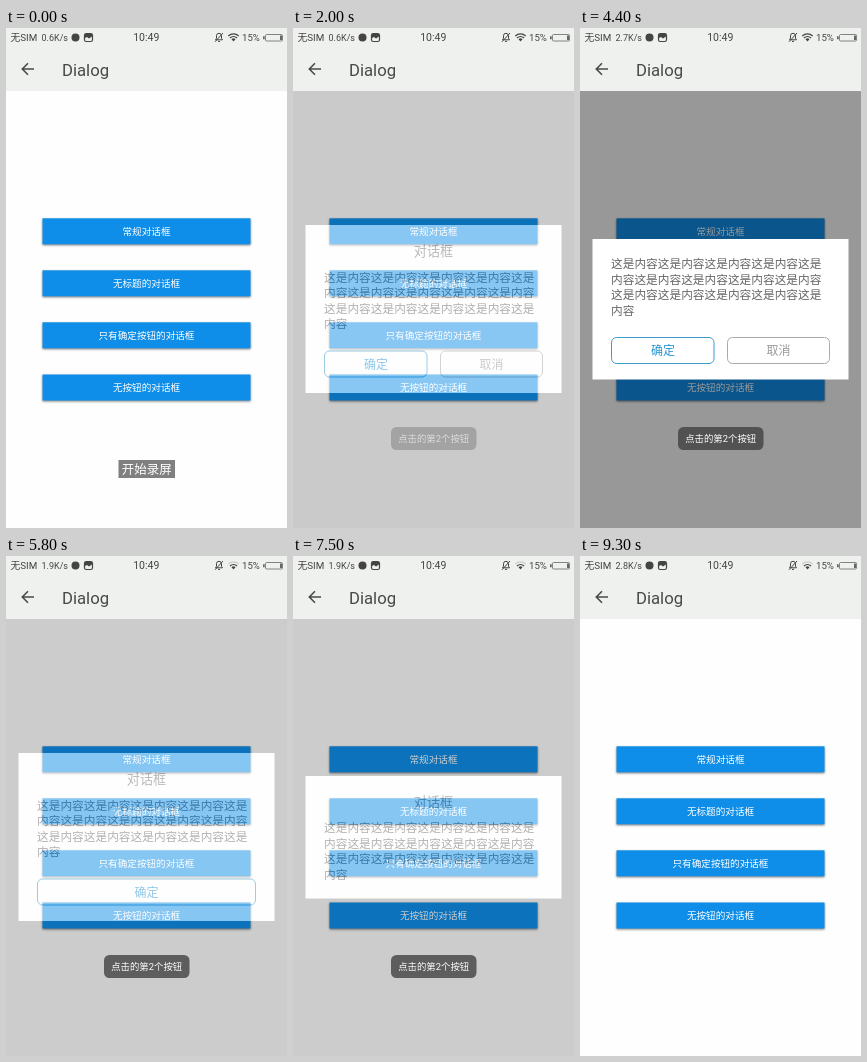
These frames come from a looping animation (281 px wide and 500 px high, 9800 ms). An HTML page:

```html
<!DOCTYPE html>
<html lang="zh-CN">
<head>
<meta charset="utf-8">
<title>Dialog</title>
<style>
html, body { margin: 0; width: 100%; height: 100%; overflow: hidden; background: #fdfefd; }
svg { display: block; width: 100vw; height: 100vh; }
text { font-family: Roboto, "Noto Sans CJK SC", "Noto Sans CJK", sans-serif; }
.mid { text-anchor: middle; }

.status { fill: #444; }
.btn rect { fill: #0f8ee9; filter: drop-shadow(0 1px .8px rgba(0, 0, 0, .5)); }
.btn text { fill: #fff; font-size: 9.6px; }
.title { font-size: 13.1px; fill: #777; }
.body { font-size: 11.7px; fill: #666; }
.ok, .cancel { font-size: 12px; }
.ok text { fill: #2494d2; }
.cancel text { fill: #999; }
.ok rect, .cancel rect { fill: none; stroke: #3f9bcd; }
.cancel rect { stroke: #aaa; }

/* One loop is 9800 ms */
.layer, .toast, .rec { animation: 9.8s linear infinite both; }
.layer { animation-timing-function: cubic-bezier(.333, .667, .667, 1); }
.full { animation-name: full; }
.untitled { animation-name: untitled; }
.single { animation-name: single; }
.bare { animation-name: bare; }
.toast { animation-name: toast; }
.rec { animation-name: rec; }
.step { animation: 9.8s step-end infinite both; }
.s1 { animation-name: s1; }
.s2 { animation-name: s2; }
.s3 { animation-name: s3; }
.s4 { animation-name: s4; }
.weak { animation-name: weak; }

@keyframes full {
  0%, 10.204% { opacity: 0; } 13.776%, 19.388% { opacity: 1; } 22.959%, 100% { opacity: 0; }
}
@keyframes untitled {
  0%, 29.592% { opacity: 0; } 33.163%, 51.02% { opacity: 1; } 54.592%, 100% { opacity: 0; }
}
@keyframes single {
  0%, 58.163% { opacity: 0; } 61.735%, 68.367% { opacity: 1; } 71.939%, 100% { opacity: 0; }
}
@keyframes bare {
  0%, 75.51% { opacity: 0; } 79.082%, 85.714% { opacity: 1; } 89.286%, 100% { opacity: 0; }
}
@keyframes toast {
  0%, 19.388% { opacity: 0; } 20.408% { opacity: .35; } 22.449%, 54.082% { opacity: 1; }
  56.122% { opacity: 0; } 58.673%, 91.837% { opacity: 1; } 94.388%, 100% { opacity: 0; }
}
@keyframes rec {
  0%, 1.02% { opacity: 1; } 4.082%, 100% { opacity: 0; }
}
@keyframes s1 { 0% { opacity: 1; } 22.449%, 100% { opacity: 0; } }
@keyframes s2 { 0% { opacity: 0; } 22.449% { opacity: 1; } 53.061%, 100% { opacity: 0; } }
@keyframes s3 { 0% { opacity: 0; } 53.061% { opacity: 1; } 83.673%, 100% { opacity: 0; } }
@keyframes s4 { 0% { opacity: 0; } 83.673%, 100% { opacity: 1; } }
@keyframes weak { 0% { opacity: 1; } 53.061%, 100% { opacity: .2; } }
</style>
</head>
<body>
<svg viewBox="0 0 281 500" preserveAspectRatio="none">
  <defs>
    <rect id="dim" y="63" width="281" height="437" fill="#000" opacity=".4"/>
    <g id="body" class="body">
      <text x="31" y="4.4">这是内容这是内容这是内容这是内容这是</text>
      <text x="31" y="19.9">内容这是内容这是内容这是内容这是内容</text>
      <text x="31" y="35.4">这是内容这是内容这是内容这是内容这是</text>
      <text x="31" y="50.9">内容</text>
    </g>
    <text id="title" class="title mid" x="140.5" y="31">对话框</text>
    <g id="pair">
      <g class="ok">
        <rect x="31.5" y=".5" width="102.5" height="26" rx="5"/>
        <text class="mid" x="83" y="18.2">确定</text>
      </g>
      <g class="cancel">
        <rect x="147.5" y=".5" width="102" height="26" rx="5"/>
        <text class="mid" x="198.5" y="18.2">取消</text>
      </g>
    </g>
  </defs>

  <rect width="281" height="500" fill="#fdfefd"/>
  <rect width="281" height="63" fill="#eff1ee"/>

  <!-- Status bar -->
  <g class="status">
    <text x="4.5" y="13" font-size="9.8">无SIM</text>
    <g font-size="9">
      <text class="step s1" x="35.5" y="13">0.6K/s</text>
      <text class="step s2" x="35.5" y="13">2.7K/s</text>
      <text class="step s3" x="35.5" y="13">1.9K/s</text>
      <text class="step s4" x="35.5" y="13">2.8K/s</text>
    </g>
    <circle cx="69.5" cy="9.5" r="4"/>
    <rect x="78.5" y="5.5" width="8" height="8" rx="1.8" fill="none" stroke="#444" stroke-width="1.2"/>
    <path d="M79 6h7v2.5l-3 2-2-1.5-2 1z"/>
    <text class="mid" x="140.3" y="13.4" font-size="10.5">10:49</text>
    <g fill="none" stroke="#444">
      <path d="M209.5 11.8h7l-1-1.600v-2.400a2.500 2.500 0 0 0-5 0v2.400zM212 13.400h2M209 13.800L217 5"/>
      <path class="step weak" d="M222.300 8a7.500 7.500 0 0 1 10.400 0" stroke-width="1.200"/>
      <path d="M224 10a5 5 0 0 1 7 0" stroke-width="1.300"/>
      <rect x="259.500" y="6.500" width="17" height="6.500" rx="1" stroke="#777" stroke-width=".9"/>
    </g>
    <path d="M225.500 11.200a3 3 0 0 1 4 0l-2 2.300z"/>
    <text x="236" y="13" font-size="9.6">15%</text>
    <path d="M257 8.300h1.700v3H257zM274 7.500h2v4.500h-2z" fill="#666"/>
  </g>

  <!-- App bar -->
  <path d="M28 41H16.500M22 35.300L16.300 41l5.700 5.700" fill="none" stroke="#4a4a4a" stroke-width="1.600"/>
  <text x="56" y="47.500" font-size="16.700" fill="#484848">Dialog</text>

  <!-- Page buttons -->
  <g class="btn">
    <rect x="36.500" y="190.300" width="208" height="26"/>
    <rect x="36.500" y="242.300" width="208" height="26"/>
    <rect x="36.500" y="294.300" width="208" height="26"/>
    <rect x="36.500" y="346.500" width="208" height="26"/>
    <text class="mid" x="140.500" y="207">常规对话框</text>
    <text class="mid" x="140.500" y="259">无标题的对话框</text>
    <text class="mid" x="140.500" y="311">只有确定按钮的对话框</text>
    <text class="mid" x="140.500" y="363">无按钮的对话框</text>
  </g>

  <!-- Dialogs, each with its own dimmed backdrop -->
  <g class="layer full">
    <use href="#dim"/>
    <g transform="translate(0 197)">
      <rect x="12.500" width="256" height="168" fill="#fff"/>
      <use href="#title"/>
      <use href="#body" y="52.500"/>
      <use href="#pair" y="125.500"/>
    </g>
  </g>
  <g class="layer untitled">
    <use href="#dim"/>
    <g transform="translate(0 211)">
      <rect x="12.500" width="256" height="140.500" fill="#fff"/>
      <use href="#body" y="25"/>
      <use href="#pair" y="98"/>
    </g>
  </g>
  <g class="layer single">
    <use href="#dim"/>
    <g transform="translate(0 197)">
      <rect x="12.500" width="256" height="168" fill="#fff"/>
      <use href="#title"/>
      <use href="#body" y="52.500"/>
      <g class="ok" transform="translate(0 125.500)">
        <rect x="31.500" y=".5" width="218" height="26" rx="5"/>
        <text class="mid" x="140.500" y="18.200">确定</text>
      </g>
    </g>
  </g>
  <g class="layer bare">
    <use href="#dim"/>
    <g transform="translate(0 220)">
      <rect x="12.500" width="256" height="122.500" fill="#fff"/>
      <use href="#title"/>
      <use href="#body" y="52"/>
    </g>
  </g>

  <!-- Toasts -->
  <g class="toast">
    <rect x="98" y="399" width="85.500" height="23" rx="5.500" fill="#404240" opacity=".8"/>
    <text class="mid" x="140.700" y="414.200" font-size="9.400" fill="#fff">点击的第2个按钮</text>
  </g>
  <g class="rec">
    <rect x="112.500" y="432" width="56.500" height="18" fill="#7f807f"/>
    <text class="mid" x="140.700" y="445.700" font-size="12.500" fill="#fff">开始录屏</text>
  </g>
</svg>
</body>
</html>
```
